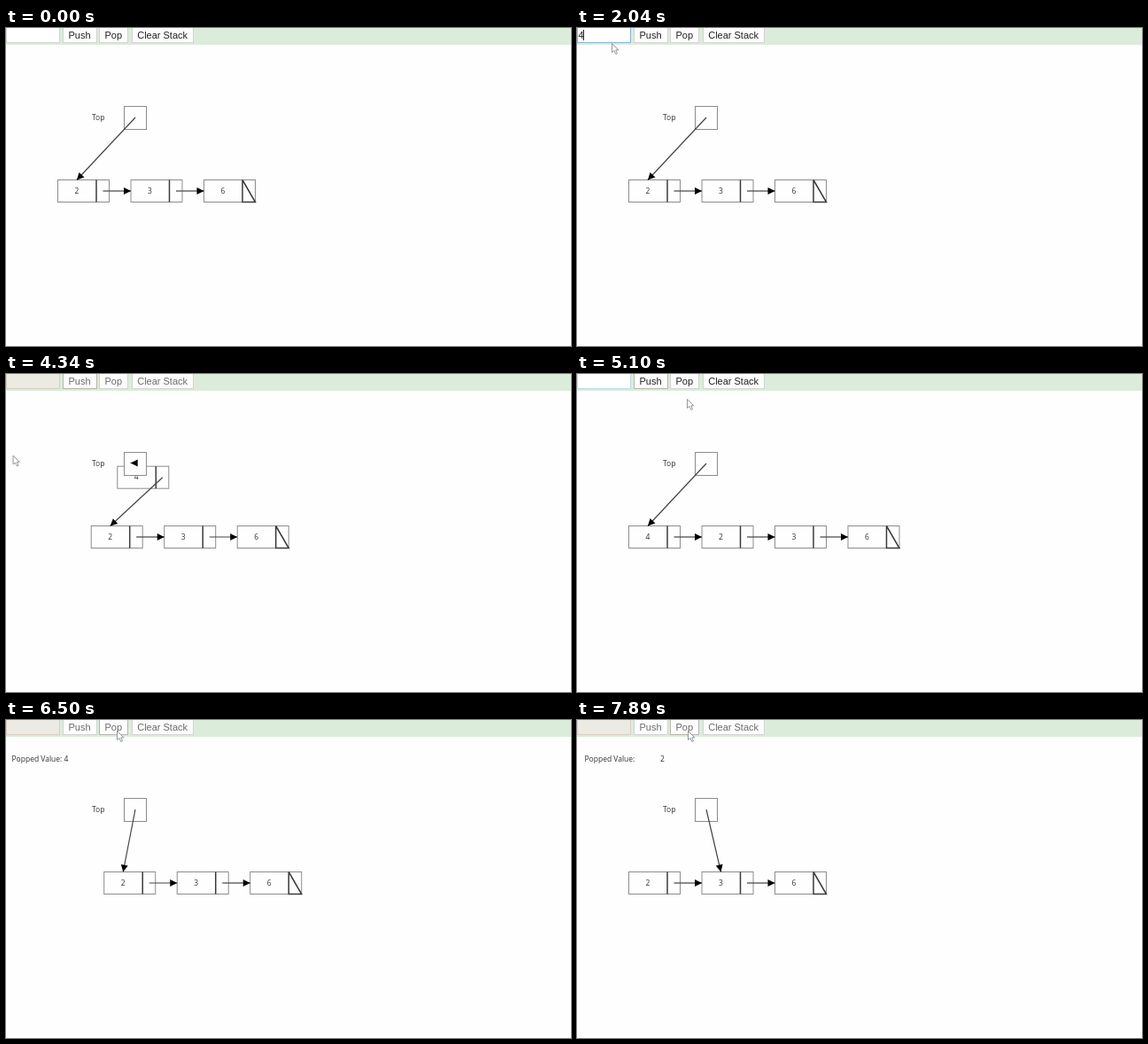
An HTML page that plays this animation: 638 px wide and 359 px high, repeating every 8 s.

```html
<!DOCTYPE html>
<html lang="en">
<head>
<meta charset="utf-8">
<title>Linked list stack</title>
<style>
  html, body { margin: 0; width: 100%; height: 100%; overflow: hidden; background: #fefefe; }
  svg { display: block; width: 638px; height: 359px; }
  .ui text { font: 11px "Liberation Sans", Arial, sans-serif; fill: #222; }
  .ui.off .btn text { fill: #6c6c6c; }
  .btn rect { fill: #fdfdfd; stroke: #d0d4d0; }
  .btn.focus rect { stroke: #b9b4ac; }
  .field { fill: #fff; stroke: #cfd6cf; }
  .field.focus { stroke: #86b4d8; }
  .field.warm { stroke: #bcdce6; }
  .off .field { fill: #ebeae3; stroke: #d9d0c2; }
  .stage text { font: 8.5px "Open Sans", "Noto Sans", sans-serif; fill: #333; }
  .mid { text-anchor: middle; }
  .box { fill: #fefefe; stroke: #8c8c8c; }
  .rule { fill: none; stroke: #3a3a3a; stroke-width: 1.5; }
  .line { stroke: #444; stroke-width: 1.2; }
  .head { fill: #000; }
</style>
</head>
<body>
<svg viewBox="0 0 638 359">
  <g class="ui" id="ui">
    <rect width="638" height="19" fill="#dcecdb"/>
    <rect class="field" id="field" x=".5" y="-1.5" width="60" height="18"/>
    <text id="typed" x="1.5" y="12">4</text>
    <path id="caret" d="M0 2V14" stroke="#222"/>
    <g class="btn" id="push"><rect x="64.5" y="-2.5" width="38" height="19"/><text x="70.5" y="12">Push</text></g>
    <g class="btn" id="pop"><rect x="105.500" y="-2.5" width="32" height="19"/><text x="111.5" y="12">Pop</text></g>
    <g class="btn"><rect x="142.5" y="-2.5" width="69" height="19"/><text x="148.200" y="12">Clear Stack</text></g>
  </g>
  <g class="stage" id="stage">
    <text id="label" y="46.500"></text>
    <text x="97" y="104">Top</text>
  </g>
  <path id="arrow" d="M.5 .5V10.500L3 8.500L4.800 12.500L6.500 11.700L4.800 7.800H7.800Z" fill="#fff" stroke="#8b8b94" stroke-width=".9"/>
  <path id="beam" d="M-2 -6H2M0 -6V6M-2 6H2" fill="none" stroke="#666"/>
</svg>
<script>
const LOOP = 8000, MOVE = 409, GAP = 82.5;
const T = {
  focus: 1000, type: 2040, push: 2600, create: 2680, carry: 2820, link: 3480,
  top: 3840, shift: 4154, pop: 5402, unlink: 5950, back: 6351, idle: 6760,
  pop2: 7312, unlink2: 7870
};
// time, x, y of the pointer tip
const path = [
  [160, 462, 341], [930, 24, 9], [2030, 24, 9], [2040, 39, 17], [2140, 39, 17],
  [2450, 82, 9], [2880, 82, 9], [3380, 7.5, 91.5], [4600, 7.5, 91.5],
  [5100, 124, 28], [5300, 125, 12], [8000, 125, 12]
];
const ids = id => document.getElementById(id);
const stage = ids("stage");
const lerp = (a, b, p) => a + (b - a) * p;
const clamp = p => Math.max(0, Math.min(1, p));
const smooth = p => p * p * (3 - 2 * p);

function add(parent, tag, attrs) {
  const el = document.createElementNS("http://www.w3.org/2000/svg", tag);
  for (const k in attrs) el.setAttribute(k, attrs[k]);
  return parent.appendChild(el);
}
const show = (el, on) => el.setAttribute("visibility", on ? "visible" : "hidden");
const place = (el, x, y) => el.setAttribute("transform", `translate(${x} ${y})`);

function makeNode(value) {
  const g = add(stage, "g", {});
  add(g, "rect", { class: "box", x: .5, y: .5, width: 58, height: 25 });
  add(g, "path", { class: "rule", d: value === 6 ? "M44 .5V25.500H58.500L44 .5" : "M44 .5V25.500" });
  const text = add(g, "text", { class: "mid", x: 22, y: 15.5 });
  text.textContent = value;
  return { g, text, x: 0, y: 171 };
}
function makeArrow() {
  const g = add(stage, "g", {});
  return {
    g,
    line: add(g, "line", { class: "line" }),
    head: add(g, "path", { class: "head", d: "M0 0L-8 -4V4Z" })
  };
}
function aim(a, x1, y1, x2, y2) {
  const coords = { x1, y1, x2, y2 };
  for (const k in coords) a.line.setAttribute(k, coords[k]);
  const turn = Math.atan2(y2 - y1, x2 - x1) * 180 / Math.PI;
  a.head.setAttribute("transform", `translate(${x2} ${y2}) rotate(${turn})`);
}

const nodes = [4, 2, 3, 6].map(makeNode);
const links = [0, 1, 2].map(makeArrow);
add(stage, "rect", { class: "box", x: 133.5, y: 88.5, width: 25, height: 26 });
const topLink = makeArrow();
const carried = add(stage, "text", { class: "mid", y: 3.5 });

function drawList(t) {
  const p = clamp((t - T.shift) / MOVE);
  const shift = p - clamp((t - T.back) / MOVE);
  const fresh = nodes[0];
  fresh.x = lerp(182, 58, p);
  fresh.y = lerp(47, 171, p);
  nodes.forEach((n, i) => {
    if (i) n.x = 58 + GAP * (i - 1 + shift);
    place(n.g, n.x, n.y);
  });
  show(fresh.g, t >= T.create && t < T.back);
  fresh.text.textContent = t >= T.carry + MOVE ? "4" : "";
  show(links[0].g, t >= T.link && t < T.back);
  links.forEach((a, i) => {
    const from = nodes[i], to = nodes[i + 1];
    const above = i === 0 && p < .866;
    aim(a, from.x + 51.5, from.y + 13, to.x + (above ? 22 : 0.5), to.y + (above ? 0.5 : 13));
  });

  let x, y;
  if (t >= T.top && t < T.unlink) {
    // attaches to the left side first, then to the top side
    if (p < .5) {
      const q = Math.min(p, .333);
      x = lerp(182, 58, q);
      y = lerp(60, 184, q);
      if (q === .333) y = 100.5;
    } else {
      x = fresh.x + 22;
      y = fresh.y + .5;
    }
  } else {
    const target = nodes[t >= T.unlink2 ? 2 : 1];
    x = target.x + 22;
    y = target.y + .5;
  }
  aim(topLink, 146, p > .333 && p < .5 ? 100.5 : 101, x, y);
}

function drawLabels(t) {
  let text = "", x = 8.5;
  if (t >= T.create && t < T.shift) text = "Pushing Value:";
  else if (t >= T.pop && t < T.back || t >= T.pop2) text = "Popped Value:";
  else if (t >= T.back) { text = "Popped Value: 4"; x = 6.5; }
  ids("label").textContent = text;
  ids("label").setAttribute("x", x);

  const pushing = t >= T.create && t < T.carry + MOVE;
  const popping = t >= T.pop && t < T.back || t >= T.pop2;
  show(carried, pushing || popping);
  carried.textContent = t >= T.pop2 ? "2" : "4";
  if (pushing) {
    const p = clamp((t - T.carry) / MOVE);
    place(carried, lerp(96.5, 204, p), lerp(43, 59, p));
  } else {
    const p = clamp((t - (t >= T.pop2 ? T.pop2 : T.pop)) / MOVE);
    place(carried, lerp(80, 96.5, p), lerp(183, 43, p));
  }
}

function drawControls(t) {
  const busy = t >= T.push && t < T.shift + MOVE || t >= T.pop && t < T.idle || t >= T.pop2;
  const focused = t >= T.focus && t < T.push;
  ids("ui").classList.toggle("off", busy);
  ids("field").classList.toggle("focus", focused);
  ids("field").classList.toggle("warm", t >= T.shift + MOVE && t < T.pop);
  ids("push").classList.toggle("focus", t > 2400 && t < T.pop);
  ids("pop").classList.toggle("focus", t > 5250);
  const typed = t >= T.type && t < T.push;
  show(ids("typed"), typed);
  const since = t - (typed ? T.type : T.focus);
  show(ids("caret"), focused && since % 1000 < 500);
  place(ids("caret"), typed ? 7.5 : 2.5, 0);
}

function drawPointer(t) {
  const next = Math.max(1, path.findIndex(k => k[0] > t));
  const a = path[next - 1], b = path[next];
  const p = smooth(clamp((t - a[0]) / (b[0] - a[0])));
  const x = lerp(a[1], b[1], p), y = lerp(a[2], b[2], p);
  const inField = x < 60 && y < 16;
  show(ids("arrow"), t >= 160 && !inField);
  show(ids("beam"), t >= 160 && inField);
  place(ids("arrow"), x, y);
  place(ids("beam"), x, y);
}

function frame() {
  const t = performance.now() % LOOP;
  drawList(t);
  drawLabels(t);
  drawControls(t);
  drawPointer(t);
  requestAnimationFrame(frame);
}
frame();
</script>
</body>
</html>
```
